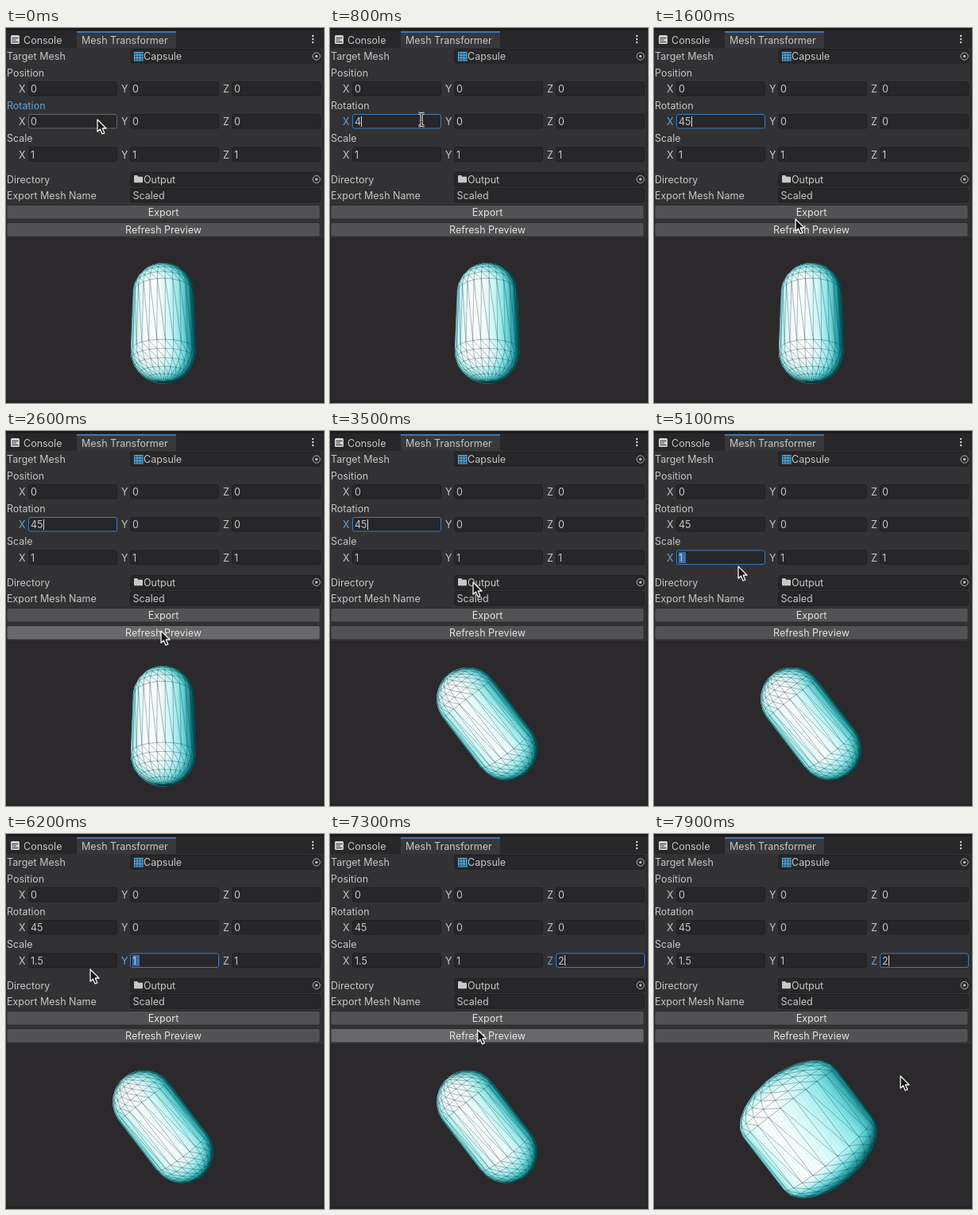
Recreate the animation shown at these times as an HTML page with a canvas. Size 400 by 471 pixels, loop 8000 ms.

```html
<!DOCTYPE html>
<html lang="en">
<head>
<meta charset="utf-8">
<title>Mesh Transformer</title>
<style>
  html, body { margin: 0; width: 100%; height: 100%; overflow: hidden; background: #2b292b; }
  canvas, svg { position: absolute; left: 0; top: 0; width: 400px; height: 471px; }
  text { font: 12.5px Inter, Roboto, sans-serif; fill: #c6c6c6; white-space: pre; }
</style>
</head>
<body>
<canvas id="view" width="400" height="471"></canvas>
<svg id="ui" viewBox="0 0 400 471"></svg>
<script>
const LOOP = 8000, STEP = 100;
const BLUE = '#5ea5e0', GREY = '#c6c6c6';
const ui = document.getElementById('ui');

function add(tag, attrs, text) {
  const el = document.createElementNS('http://www.w3.org/2000/svg', tag);
  for (const k in attrs) el.setAttribute(k, attrs[k]);
  if (text !== undefined) el.textContent = text;
  ui.append(el);
  return el;
}
const box = (x, y, w, h, fill, extra) => add('rect', { x, y, width: w, height: h, fill, ...extra });
const label = (x, y, text, extra) => add('text', { x, y: y + 4.5, ...extra }, text);
const path = (d, extra) => add('path', { d, fill: 'none', ...extra });

// Window frame and tabs
box(0, 0, 400, 265, '#323133');
box(0, 0, 400, 25, '#272628');
box(0, 0, 400, 3, '#1c1b1d');
box(89, 4, 125, 21, '#38373a');
box(89, 4, 125, 2, '#3b74b4');
box(0, 264, 400, 1, '#252426');
box(0, 468.5, 400, 1, '#1d1c1e');
box(398, 25, 1, 444, '#242325');
box(6, 9, 11, 11, '#d0d0d0', { rx: 1.5 });
path('M7.5 12.5H15.5M7.5 15H13M7.5 17.5H15.5', { stroke: '#323133' });
label(22, 15, 'Console');
label(95, 15, 'Mesh Transformer');
for (const y of [10, 14, 18]) add('circle', { cx: 386, cy: y, r: 1.2, fill: '#d0d0d0' });

const field = (x, y, w) => box(x + .5, y + .5, w - 1, 17.5, '#272628', { rx: 2.5, stroke: '#1f1e20' });
function picker(y) {
  add('circle', { cx: 390.5, cy: y, r: 4.6, fill: 'none', stroke: '#b8b8b8' });
  add('circle', { cx: 390.5, cy: y, r: 1.7, fill: '#b8b8b8' });
}

// Static rows
label(1, 35.5, 'Target Mesh');
field(156, 26, 240);
box(161, 30, 11, 11, '#2a5873');
path('M161.5 30V41M165 30V41M168.5 30V41M172 30V41M161 30.5H172.5M161 34H172.5M161 37.5H172.5M161 41H172.5', { stroke: '#5fb4e0', 'stroke-width': .9 });
label(173, 35.5, 'Capsule');
picker(35.5);
label(1, 190, 'Directory');
field(156, 181, 240);
path('M161 186Q161 185 162 185H165L166.5 186.7H171Q172 186.7 172 187.7V193Q172 194.2 171 194.2H162Q161 194.2 161 193Z', { style: 'fill:#c8c8c8' });
label(173, 190, 'Output');
picker(190);
label(1, 210.5, 'Export Mesh Name');
field(156, 201, 240);
label(159.5, 210.5, 'Scaled');

const buttons = [['Export', 222], ['Refresh Preview', 244]].map(([name, y]) => {
  const el = box(1, y + .5, 394, 17.5, '#525153', { rx: 2.5, stroke: '#282729', 'stroke-width': .8 });
  label(198, y + 9.5, name, { 'text-anchor': 'middle', style: 'fill:#e2e2e2' });
  return { el, y };
});

// Vector rows
const cells = {}, heads = {};
[['p', 'Position', 56, '0'], ['r', 'Rotation', 97, '0'], ['s', 'Scale', 138.5, '1']].forEach(([key, name, y, val]) => {
  heads[key] = label(1, y, name);
  [['x', 16, 28], ['y', 145, 156], ['z', 273, 284]].forEach(([axis, lx, fx]) => {
    const mid = y + 20.5, top = mid - 9.5;
    cells[key + axis] = {
      x: fx, y: top, val,
      tag: label(lx, mid, axis.toUpperCase()),
      el: field(fx, top, 112),
      mark: box(fx + 3, mid - 7, 9, 14, '#3a6ea8', { visibility: 'hidden' }),
      text: label(fx + 3, mid, val),
      caret: box(0, mid - 6.5, 1, 13, '#d8d8d8', { visibility: 'hidden' })
    };
  });
});

// Cursors
const arrow = path('M0 0V15.2L3.4 12L6 18L8.8 16.8L6.2 11H11Z', { style: 'fill:#151515', stroke: '#f2f2f2', 'stroke-width': 1.3, 'stroke-linejoin': 'round' });
const beamShape = 'M-3.5 -8Q0 -8 0 -5.5Q0 -8 3.5 -8M0 -5.5V5.5M-3.5 8Q0 8 0 5.5Q0 8 3.5 8M-2 3H2';
const beam = add('g', {});
beam.append(
  path(beamShape, { stroke: '#f2f2f2', 'stroke-width': 3 }),
  path(beamShape, { stroke: '#151515', 'stroke-width': 1.1 })
);

// time, focused cell, its text, whether it is selected
const edits = [
  [300, 'rx', '0', 1], [800, 'rx', '4', 0], [900, 'rx', '45', 0],
  [4200, 'sx', '1', 0], [4500, 'sx', '1', 1], [5400, 'sx', '1', 0],
  [5600, 'sx', '1.', 0], [5900, 'sx', '1.5', 0],
  [6100, 'sy', '1', 1], [6400, 'sz', '1', 1], [6800, 'sz', '2', 0]
];
// time, x, y of the pointer
const moves = [
  [0, 115, 115], [1000, 115, 115], [1600, 178, 240], [1800, 181, 244], [2400, 195, 251],
  [3000, 195, 251], [3500, 180, 190], [4200, 107, 153], [4700, 107, 153], [5000, 106, 170],
  [6800, 106, 170], [7400, 192, 252], [7600, 194, 252], [7900, 310, 304]
];
// time, rotation about X, scale
const shapes = [[0, 0, [1, 1, 1]], [2900, 45, [1, 1, 1]], [7700, 45, [1.5, 1, 2]]];

function pointer(t) {
  const i = moves.findIndex(m => m[0] > t);
  if (i < 0) return moves[moves.length - 1].slice(1);
  const [a, b] = [moves[i - 1], moves[i]];
  let k = (t - a[0]) / (b[0] - a[0]);
  k = k * k * (3 - 2 * k);
  return [a[1] + (b[1] - a[1]) * k, a[2] + (b[2] - a[2]) * k];
}

// Capsule mesh
const SEG = 26, RINGS = 6, SUB = 4, DIST = 5.5, ZOOM = 78;
const yaw = 121 * Math.PI / 180, pitch = 23.5 * Math.PI / 180;
const sy = Math.sin(yaw), cy = Math.cos(yaw), sp = Math.sin(pitch), cp = Math.cos(pitch);
const CAM = [[cy, 0, -sy], [-sy * sp, cp, -cy * sp], [sy * cp, sp, cy * cp]];
const dot = (a, b) => a[0] * b[0] + a[1] * b[1] + a[2] * b[2];
const unit = v => { const l = Math.hypot(...v); return v.map(c => c / l); };
const mix = (a, b, k) => a.map((c, i) => c + (b[i] - c) * k);
const LIGHT = unit([-.36, .1, -.92]);
const RAMP = [[0, [14, 98, 104]], [.3, [52, 176, 180]], [.55, [125, 228, 230]], [.8, [205, 250, 250]], [.95, [252, 255, 255]], [1.01, [255, 255, 255]]];

function tone(n) {
  const d = Math.max(0, dot(unit(n), LIGHT));
  const i = RAMP.findIndex(r => r[0] > d), [a, b] = [RAMP[i - 1], RAMP[i]];
  return `rgb(${mix(a[1], b[1], (d - a[0]) / (b[0] - a[0])).map(Math.round)})`;
}
const project = p => {
  const k = ZOOM * DIST / (DIST + p[2]);
  return [197.8 + p[0] * k, 368 - p[1] * k];
};
const facing = (a, b, c, d) => (c[0] - a[0]) * (d[1] - b[1]) - (c[1] - a[1]) * (d[0] - b[0]) > 0;

function drawCapsule(g, angle, scale) {
  const s = Math.sin(angle * Math.PI / 180), c = Math.cos(angle * Math.PI / 180);
  const toView = v => {
    const w = [v[0], v[1] * c - v[2] * s, v[1] * s + v[2] * c];
    return CAM.map(axis => dot(axis, w));
  };
  const vertex = (row, col) => {
    const low = row > RINGS, phi = (low ? row - 1 : row) * Math.PI / 2 / RINGS;
    const a = col * 2 * Math.PI / SEG;
    const n = [Math.sin(phi) * Math.cos(a), Math.cos(phi), Math.sin(phi) * Math.sin(a)];
    const p = [n[0] / 2, n[1] / 2 + (low ? -.5 : .5), n[2] / 2];
    return { p: toView(p.map((v, i) => v * scale[i])), n: unit(toView(n.map((v, i) => v / scale[i]))) };
  };
  const blend = (q, u, v, key) => mix(mix(q[0][key], q[1][key], u), mix(q[3][key], q[2][key], u), v);
  const trace = pts => {
    g.beginPath();
    pts.forEach(p => g.lineTo(p[0], p[1]));
    g.closePath();
  };
  const lines = [];
  g.clearRect(0, 0, 400, 471);
  g.lineWidth = .7;
  for (let r = 0; r <= RINGS * 2; r++) for (let k = 0; k < SEG; k++) {
    const quad = [vertex(r, k), vertex(r, k + 1), vertex(r + 1, k + 1), vertex(r + 1, k)];
    const pts = quad.map(v => project(v.p));
    if (!facing(...pts)) continue;
    lines.push(pts);
    for (let i = 0; i < SUB; i++) for (let j = 0; j < SUB; j++) {
      const u = i / SUB, v = j / SUB, d = 1 / SUB;
      g.fillStyle = g.strokeStyle = tone(blend(quad, u + d / 2, v + d / 2, 'n'));
      trace([[u, v], [u + d, v], [u + d, v + d], [u, v + d]].map(([x, y]) => project(blend(quad, x, y, 'p'))));
      g.fill();
      g.stroke();
    }
  }
  g.strokeStyle = 'rgba(10,50,55,.36)';
  g.lineWidth = .5;
  for (const [a, b, e, d] of lines) {
    trace([a, b, e]);
    g.stroke();
    trace([a, e, d]);
    g.stroke();
  }
}

const g = document.getElementById('view').getContext('2d');
let shown = null, last = -1;

function render(t) {
  const shape = shapes.filter(s => s[0] <= t).pop();
  if (shape !== shown) drawCapsule(g, shape[1], shape[2]);
  shown = shape;

  const done = edits.filter(e => e[0] <= t), now = done[done.length - 1];
  const [px, py] = pointer(t);
  const values = {};
  done.forEach(e => values[e[1]] = e[2]);
  heads.r.style.fill = now ? GREY : BLUE;

  let overCell = false;
  for (const key in cells) {
    const f = cells[key], on = now && now[1] === key;
    const over = px > f.x && px < f.x + 112 && py > f.y && py < f.y + 18;
    overCell = overCell || over;
    f.text.textContent = values[key] || f.val;
    f.tag.style.fill = on ? BLUE : GREY;
    f.el.setAttribute('stroke', on ? '#3c7cc0' : over ? '#676668' : '#1f1e20');
    f.mark.setAttribute('visibility', on && now[3] ? 'visible' : 'hidden');
    f.caret.setAttribute('visibility', on && !now[3] ? 'visible' : 'hidden');
    if (on) f.caret.setAttribute('x', Math.round(f.x + 3 + f.text.getComputedTextLength()));
  }
  for (const b of buttons) {
    const over = py > b.y && py < b.y + 18 && px < 395;
    b.el.setAttribute('fill', over ? '#686769' : '#525153');
  }
  const typing = overCell && t > 0;
  const at = `translate(${px.toFixed(1)} ${py.toFixed(1)})`;
  arrow.setAttribute('transform', at);
  beam.setAttribute('transform', at);
  arrow.setAttribute('visibility', typing ? 'hidden' : 'visible');
  beam.setAttribute('visibility', typing ? 'visible' : 'hidden');
}

function tick() {
  const t = Math.floor(performance.now() % LOOP / STEP) * STEP;
  if (t !== last) render(last = t);
  requestAnimationFrame(tick);
}
tick();
</script>
</body>
</html>
```
